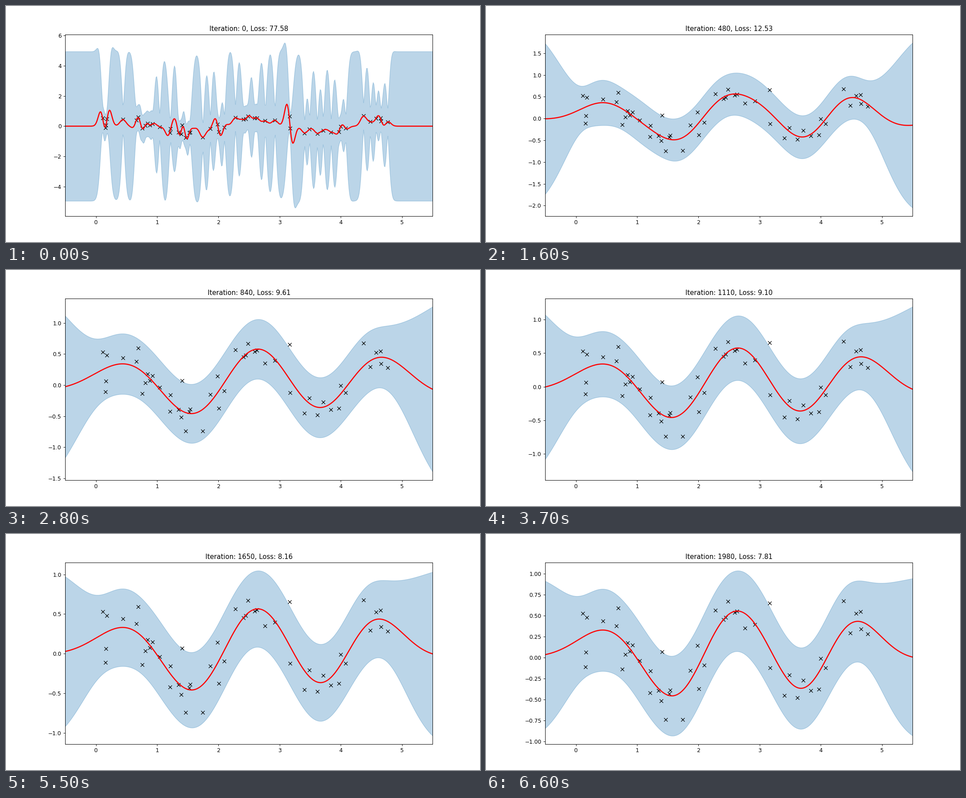
Animation, 1058 px wide and 529 px high, one loop 6.7 s. Source, as a matplotlib script:

```python
"""Gaussian process regression: the posterior while Adam fits the kernel."""
import numpy as np
import matplotlib.pyplot as plt
from matplotlib.animation import FuncAnimation

N = 50
STRIDE, FRAMES = 30, 67
LEARN_RATE = 0.005
JITTER = 1e-6
START = (6.0, 0.05, 0.1)  # variance, length, noise

rng = np.random.RandomState(0)


def uniform(n):
    """24-bit uniform numbers in [0, 1)."""
    raw = rng.randint(0, 2**32, size=n, dtype=np.uint32)
    return (raw & 0xFFFFFF) / 2**24


def box_muller(u):
    """Turn 16 uniform numbers into 16 normal ones."""
    radius = np.sqrt(-2 * np.log(1 - u[:8]))
    angle = 2 * np.pi * u[8:]
    return np.concatenate([radius * np.cos(angle), radius * np.sin(angle)])


def normal(n):
    """Normal numbers in blocks of 16; the last block is drawn afresh."""
    out = uniform(n)
    for i in range(0, n - 15, 16):
        out[i:i + 16] = box_muller(out[i:i + 16])
    if n % 16:
        out[-16:] = box_muller(uniform(16))
    return out


X = 5 * uniform(N)
Y = 0.5 * np.sin(3 * X) + 0.2 * normal(N)
XT = np.linspace(-0.5, 5.5, 500)
D2 = (X[:, None] - X) ** 2
D2T = (XT[:, None] - X) ** 2
EYE = np.eye(N)


def rbf(d2, var, length):
    return var * np.exp(-0.5 * d2 / length**2)


def loss_and_grad(theta):
    """Negative log likelihood and its slope in the log parameters."""
    var, length, noise = np.exp(theta)
    kern = rbf(D2, var, length)
    cov = kern + (noise + JITTER) * EYE
    inv = np.linalg.inv(cov)
    alpha = inv @ Y
    loss = 0.5 * (Y @ alpha + np.linalg.slogdet(cov)[1] + N * np.log(2 * np.pi))
    w = 0.5 * (inv - np.outer(alpha, alpha))
    grad = np.array([np.sum(w * kern),
                     np.sum(w * kern * D2) / length**2,
                     noise * np.trace(w)])
    return loss, grad


def fit():
    """Adam on the log parameters; keeps every STRIDE-th state."""
    theta = np.log(START)
    m, v = np.zeros(3), np.zeros(3)
    history = []
    for i in range(STRIDE * (FRAMES - 1) + 1):
        loss, grad = loss_and_grad(theta)
        if i % STRIDE == 0:
            history.append((np.exp(theta), loss))
        m = 0.9 * m + 0.1 * grad
        v = 0.999 * v + 0.001 * grad**2
        m_hat = m / (1 - 0.9 ** (i + 1))
        v_hat = v / (1 - 0.999 ** (i + 1))
        theta = theta - LEARN_RATE * m_hat / (np.sqrt(v_hat) + 1e-8)
    return history


def posterior(var, length, noise):
    cov = rbf(D2, var, length) + (noise + JITTER) * EYE
    cross = rbf(D2T, var, length)
    gain = np.linalg.solve(cov, cross.T).T
    spread = var + noise - np.sum(gain * cross, axis=1)
    return gain @ Y, np.sqrt(spread)


history = fit()
fig, ax = plt.subplots(figsize=(12, 6), dpi=88.1667)
fig.subplots_adjust(top=0.8797)


def update(k):
    params, loss = history[k]
    mean, sd = posterior(*params)
    ax.cla()
    ax.plot(X, Y, "kx")
    ax.plot(XT, mean, "r", lw=2)
    ax.fill_between(XT, mean - 2 * sd, mean + 2 * sd, color="C0", alpha=0.3)
    ax.set_xlim(-0.5, 5.5)
    ax.set_title(f"Iteration: {k * STRIDE}, Loss: {loss:0.2f}")
    return ax.get_children()


anim = FuncAnimation(fig, update, frames=FRAMES, interval=100,
                     init_func=lambda: [], repeat=True, repeat_delay=0)
plt.show()
```
